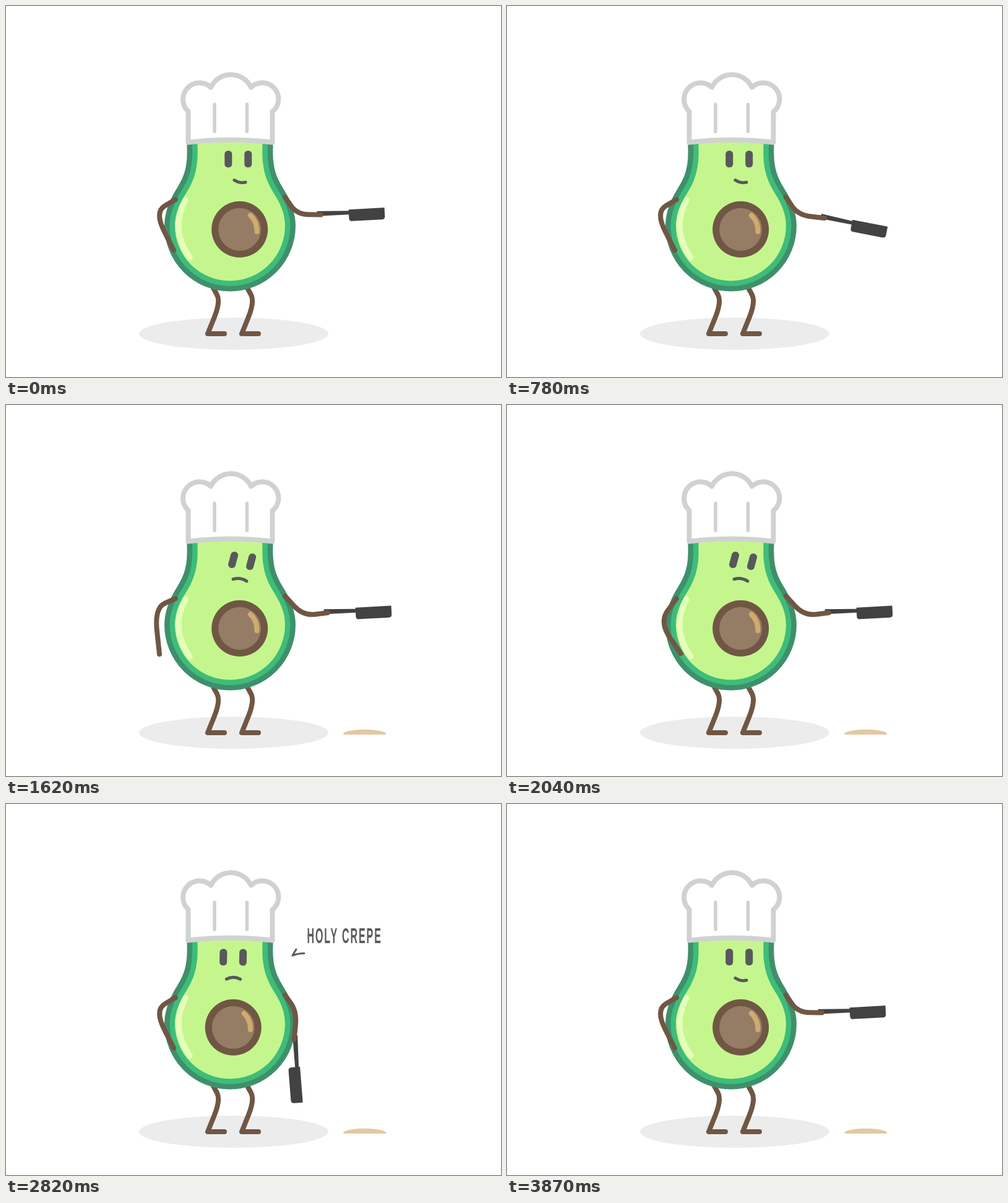
Write an HTML page that moves like this. It is 800 px wide and 600 px high and loops after 3.9 s.

```html
<!DOCTYPE html>
<html lang="en">
<head>
<meta charset="utf-8">
<title>Avocado chef</title>
<style>
  html, body { margin: 0; width: 100%; height: 100%; overflow: hidden; background: #fff; }
  svg { display: block; width: 100%; height: 100%; }
  .line { fill: none; stroke-linecap: round; stroke-linejoin: round; }
  .limb { stroke: #705744; stroke-width: 8; }
  .hat { stroke: #d0d2d2; }
  .ink { fill: #58585b; }
  .mouth { stroke: #58585b; stroke-width: 5; }
  .pan { fill: #424242; }
  .crepe { fill: #e4c8a1; }
  .speech { fill: #4c4c4c; font: bold 35px "Liberation Sans", Arial, sans-serif; letter-spacing: 4px; }
</style>
</head>
<body>
<svg viewBox="0 0 800 600">
  <defs>
    <path id="flesh" d="M309.500 180V228C311 264 303 284 291 303C281.500 318 273 335 273 355.500A89 89 0 0 0 451 355.500C451 335 442.500 318 433 303C421 284 413 264 414.500 228V180"/>
    <rect id="eye" class="ink" x="-6" y="-13.500" width="12" height="27" rx="5.500"/>
  </defs>

  <ellipse cx="368" cy="530" rx="153" ry="26" fill="#ececec"/>
  <path id="leg" class="line limb"/>
  <use href="#leg" x="55"/>

  <use href="#flesh" fill="none" stroke="#3e906b" stroke-width="34"/>
  <use href="#flesh" fill="none" stroke="#3ebc79" stroke-width="17"/>
  <use href="#flesh" fill="#c5f68e"/>
  <path class="line" d="M290 314Q264.500 361 297 407" stroke="#e4ffba" stroke-width="9.500"/>

  <g id="pit">
    <circle cx="377.700" cy="361.300" r="45.500" fill="#705744"/>
    <circle cx="377.700" cy="361.300" r="34.500" fill="#957d65"/>
    <path class="line" d="M395 338.500Q406 349 405.500 365" stroke="#d0aa70" stroke-width="8"/>
  </g>

  <use id="eyeL" href="#eye"/>
  <use id="eyeR" href="#eye"/>
  <path id="mouth" class="line mouth"/>

  <g id="hat">
    <path class="line hat" style="fill:#fff" stroke-width="8" d="M294.500 220.500V170.500A26.250 26.250 0 1 1 331 131.500A36 36 0 0 1 396 131.500A26.250 26.250 0 1 1 430.500 171V220.500Q363 212.500 294.500 220.500Z"/>
    <path class="line hat" stroke-width="5.500" d="M337 159V203M389.500 159V203"/>
  </g>

  <rect id="flying" class="crepe" y="-3" height="6" rx="3"/>
  <path id="landed" class="crepe" d="M545 531.500C546 528 564 524.800 579.700 524.800S613.500 528 614.500 531.500Q614.500 533 611 533H548.500Q545 533 545 531.500Z"/>

  <path id="pan" class="pan" d="M-6 -6L45 -4V-6H103V8Q103 13 98 13H50Q45 13 45 8V2H-6Z"/>
  <path id="armL" class="line limb"/>
  <path id="armR" class="line limb"/>

  <g id="speech">
    <text class="speech" transform="translate(486.500 224.500) scale(.46 1)">HOLY CREPE</text>
    <path class="line" d="M469 235L463 245Q472 241.500 482 241.500" stroke="#4c4c4c" stroke-width="3"/>
  </g>
</svg>
<script>
const LOOP = 3900, TICK = 30;
const LAUNCH = 1102, FLIGHT = 500;

const set = (id, name, value) => document.getElementById(id).setAttribute(name, value);
const move = (id, x, y, turn = 0) =>
  set(id, "transform", `translate(${x} ${y}) rotate(${turn})`);

const smooth = u => u * u * (3 - 2 * u);
const easeOut = u => 1 - (1 - u) ** 2.5;
const ramp = (t, from, to) => smooth(Math.min(1, Math.max(0, (t - from) / (to - from))));
const hump = (t, peak, half) => ramp(Math.abs(t - peak), half, 0);

// A track is a list of [time, pose, easing on arrival].
function sample(track, t) {
  const i = track.findIndex(key => key[0] > t);
  if (i === 0) return track[0][1];
  if (i < 0) return track[track.length - 1][1];
  const [t0, a] = track[i - 1], [t1, b, ease = smooth] = track[i];
  const k = ease((t - t0) / (t1 - t0));
  return a.map((v, n) => v + (b[n] - v) * k);
}

// A limb is two straight bones whose joint is rounded from midpoint to midpoint.
function limb(x, y, [jx, jy, ex, ey]) {
  return `M${x} ${y}L${(x + jx) / 2} ${(y + jy) / 2}` +
    `Q${jx} ${jy} ${(jx + ex) / 2} ${(jy + ey) / 2}L${ex} ${ey}`;
}

// Pan arm: elbow, hand, pan angle.
const rest  = [470, 337, 509, 337.5, -3];
const dip   = [475, 339, 515, 339, 4];
const reach = [480, 341, 520, 336, -3];
const low   = [470, 338, 513, 343, 11];
const toss  = [485, 333, 525.5, 338.5, -12.4];
const hang  = [470, 336, 465, 381, 86.5];
const panTrack = [
  [0, rest], [135, dip], [270, reach], [540, rest], [780, low], [990, low],
  [1110, toss], [1140, toss], [1320, reach], [2520, reach],
  [2880, hang, easeOut], [3510, hang], [3870, rest, easeOut]
];

// Free arm: elbow, hand.
const hip   = [240, 333, 271, 395];
const loose = [240, 328, 248, 403];
const tuck  = [246, 351, 281, 402];
const armTrack = [
  [990, hip], [1140, loose], [1830, loose], [2040, tuck], [2520, tuck], [2880, hip, easeOut]
];

// Face: body turn, eye x, eye y, eye tilt, mouth tilt, mouth curve.
const calm  = [0, 375.3, 247.5, 0, 11, 4];
const worry = [0, 381.6, 252, 15, 8, -5];
const front = [-11.3, 366, 247.5, 0, 0, -6];
const faceTrack = [
  [1350, calm], [1530, worry], [2520, worry], [2880, front], [3510, front], [3870, calm]
];

function drawArms(t) {
  const pose = sample(panTrack, t);
  const [, , x, y, angle] = pose;
  set("armR", "d", limb(451, 309, pose));
  move("pan", x, y, angle);
  set("armL", "d", limb(274, 313, sample(armTrack, t)));
}

function drawHop(t) {
  const stretch = hump(t, 1125, 120);
  const ankle = 326 + stretch;
  const knee = [347 - 10 * stretch, 478 + 2 * stretch, ankle, 530];
  set("leg", "d", limb(335, 456, knee) + `L${ankle + 27} ${530 - 7 * stretch}`);
  move("hat", 0, -15 * hump(t, 1110, 75));
}

function drawFace(t) {
  const [turn, x, y, tilt, mouthTilt, curve] = sample(faceTrack, t);
  const dx = 16 - tilt / 10, dy = tilt / 10, half = 10 - curve / 5;
  move("eyeL", x - dx, y - dy, tilt);
  move("eyeR", x + dx, y + dy, tilt);
  set("mouth", "d", `M${-half} 0Q0 ${curve} ${half} 0`);
  move("mouth", 378 + turn, 283.3, mouthTilt);
  move("pit", turn, 0);
}

// Thrown with constant gravity while tumbling once, then flat on the floor.
function drawCrepe(t) {
  const s = t - LAUNCH, inAir = s >= 0 && s < FLIGHT;
  set("flying", "visibility", inAir ? "visible" : "hidden");
  set("landed", "visibility", s >= FLIGHT ? "visible" : "hidden");
  if (!inAir) return;
  const width = 40 + 22 * s / FLIGHT;
  set("flying", "x", -width / 2);
  set("flying", "width", width);
  move("flying", 589 - .018 * s, 325 - 1.98 * s + .004785 * s * s, -36 - .648 * s);
}

function draw(t) {
  drawArms(t);
  drawHop(t);
  drawFace(t);
  drawCrepe(t);
  set("speech", "opacity", ramp(t, 2550, 2880) - ramp(t, 3540, 3870));
}

const start = performance.now();
function frame() {
  const t = (performance.now() - start) % LOOP;
  draw(Math.floor(t / TICK) * TICK);
  requestAnimationFrame(frame);
}
frame();
</script>
</body>
</html>
```
